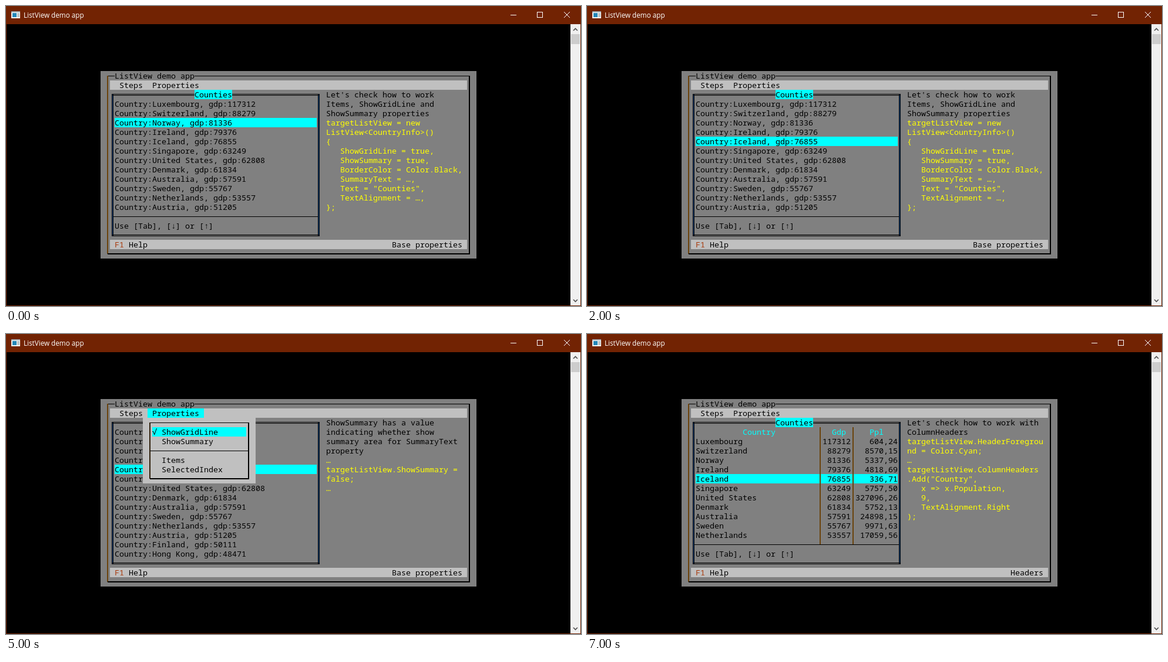
Recreate the animation shown at these times as an HTML page with a canvas. Size 979 by 512 pixels, loop 8 s.

```html
<!DOCTYPE html>
<html lang="en">
<head>
<meta charset="utf-8">
<title>ListView demo app</title>
<style>
html, body { margin: 0; width: 100%; height: 100%; overflow: hidden; background: #000; }
canvas { display: block; }
</style>
</head>
<body>
<canvas id="stage" width="979" height="512"></canvas>
<script>
const ctx = document.getElementById('stage').getContext('2d', { alpha: false });
const CELL_W = 8, CELL_H = 16, LEFT = 161, TOP = 111;
const GRAY = '#808080', SILVER = '#c0c0c0', CYAN = '#00ffff', YELLOW = '#ffff00';
const BLACK = '#000', BROWN = '#6b430c', BLUE = '#0b4a86', ACCENT = '#722303';
const MONO = '13.333px "Noto Sans Mono", "DejaVu Sans Mono", monospace';

const countries = [
  ['Luxembourg', '117312', '604,24'], ['Switzerland', '88279', '8570,15'],
  ['Norway', '81336', '5337,96'], ['Ireland', '79376', '4818,69'],
  ['Iceland', '76855', '336,71'], ['Singapore', '63249', '5757,50'],
  ['United States', '62808', '327096,26'], ['Denmark', '61834', '5752,13'],
  ['Australia', '57591', '24898,15'], ['Sweden', '55767', '9971,63'],
  ['Netherlands', '53557', '17059,56'], ['Austria', '51205'],
  ['Finland', '50111'], ['Hong Kong', '48471']
];

const itemsHelp = {
  note: "Let's check how to work\nItems, ShowGridLine and\nShowSummary properties",
  code: `targetListView = new
ListView<CountryInfo>()
{
   ShowGridLine = true,
   ShowSummary = true,
   BorderColor = Color.Black,
   SummaryText = …,
   Text = "Counties",
   TextAlignment = …,
};`
};
const indexHelp = {
  note: `FirstVisibleItemIndex has an
index of first visible item,
SelectedIndex has an index of
the selected item in the
control. Also use
VisibleItems property for get
all visible items.`,
  code: 'FirstVisibleItemIndex: 0\nSelectedIndex: 4'
};
const summaryHelp = {
  note: `ShowSummary has a value
indicating whether show
summary area for SummaryText
property`,
  code: '…\ntargetListView.ShowSummary =\nfalse;\n…'
};
const gridHelp = {
  note: `ShowGridLine has a value
indicating whether grid lines
appear between the columns
containing the items in the
control`,
  code: '…\ntargetListView.ShowGridLine =\nfalse;\n…'
};
const headersHelp = {
  note: "Let's check how to work with\nColumnHeaders",
  code: `targetListView.HeaderForegrou
nd = Color.Cyan;
…
targetListView.ColumnHeaders
.Add("Country",
   x => x.Population,
   9,
   TextAlignment.Right
);`
};

const base = { selected: 4, grid: true, summary: true, menu: null, headers: false };
const scenes = [
  { help: itemsHelp, selected: 2 },
  { help: itemsHelp, selected: 3 },
  { help: itemsHelp },
  { help: indexHelp, menu: 'ShowSummary' },
  { help: summaryHelp, summary: false },
  { help: summaryHelp, summary: false, menu: 'ShowGridLine' },
  { help: gridHelp, summary: false, grid: false },
  { help: headersHelp, headers: true }
].map(scene => ({ ...base, ...scene }));

function fill(color, x, y, w, h) {
  ctx.fillStyle = color;
  ctx.fillRect(x, y, w, h);
}

function cells(color, col, row, cols, rows = 1) {
  fill(color, LEFT + col * CELL_W, TOP + row * CELL_H, cols * CELL_W, rows * CELL_H);
}

function text(str, col, row, color = BLACK) {
  ctx.font = MONO;
  ctx.fillStyle = color;
  [...str].forEach((ch, i) => {
    if (ch !== ' ') ctx.fillText(ch, LEFT + (col + i) * CELL_W, TOP + row * CELL_H + 13);
  });
}

const textRight = (str, endCol, row) => text(str, endCol - str.length, row);

function stroke(color, points, width = 1) {
  ctx.strokeStyle = color;
  ctx.lineWidth = width;
  ctx.beginPath();
  points.forEach(([x, y]) => ctx.lineTo(x, y));
  ctx.stroke();
}

function drawWindow() {
  fill(ACCENT, 0, 0, 979, 512);
  fill(BLACK, 1, 31, 960, 480);

  fill('#f4f4f4', 9, 9, 15, 12);
  fill('#a8b4bc', 9, 9, 15, 2);
  fill('#2386b8', 11, 12, 7, 7);
  fill('#bcc4c8', 19, 12, 4, 7);
  ctx.font = '11.7px "Open Sans", "Noto Sans", sans-serif';
  ctx.fillStyle = '#fff';
  ctx.fillText('ListView demo app', 30, 20);

  fill('#fff', 859, 15, 10, 1);
  ctx.strokeStyle = '#fff';
  ctx.lineWidth = 1;
  ctx.strokeRect(904.5, 10.5, 9, 9);
  stroke('#fff', [[950, 10], [960, 20]]);
  stroke('#fff', [[960, 10], [950, 20]]);

  fill('#f0f0f0', 961, 31, 17, 480);
  fill('#cdcdcd', 962, 48, 15, 17);
  stroke('#505050', [[966, 42], [969.5, 38.5], [973, 42]], 1.6);
  stroke('#505050', [[966, 501], [969.5, 504.5], [973, 501]], 1.6);
}

function drawDialog(scene) {
  cells(GRAY, 0, 0, 80, 20);
  fill(BLACK, 173, 119, 12, 1);
  fill(BLACK, 321, 119, 468, 1);
  fill(BROWN, 172, 119, 2, 304);
  fill(BLACK, 788, 119, 2, 305);
  fill(BLACK, 173, 422, 617, 2);
  text('ListView demo app', 3, 0);

  cells(SILVER, 2, 1, 76);
  if (scene.menu) cells(CYAN, 10, 1, 12);
  text('Steps', 4, 1);
  text('Properties', 11, 1);

  cells(SILVER, 2, 18, 76);
  text('F1', 3, 18, '#a83c10');
  text('Help', 6, 18);
  textRight(scene.headers ? 'Headers' : 'Base properties', 77, 18);
}

function drawGrid(scene) {
  for (const x of [180, 531]) {
    fill(BLACK, x, 150, 3, 243);
    fill(BLUE, x + 1, 150, 1, 243);
  }
  for (const y of [150, 390]) {
    fill(BLACK, 180, y, 354, 1);
    fill(GRAY, 183, y + 1, 348, 1);
    fill(BLACK, 180, y + 2, 354, 1);
  }
  cells(CYAN, 20, 2, 8);
  text('Counties', 20, 2);
  if (scene.summary) {
    fill(BLACK, 183, 359, 348, 1);
    text('Use [Tab], [↓] or [↑]', 3, 16);
  }
}

function drawList(scene) {
  if (scene.grid) drawGrid(scene);
  const firstRow = scene.headers ? 4 : 3;
  const count = (scene.summary ? 15 : 17) - firstRow;
  cells(CYAN, 3, firstRow + scene.selected, scene.grid ? 43 : 44);

  if (scene.headers) {
    text('Country', 13, 3, CYAN);
    text('Gdp', 32, 3, CYAN);
    text('Ppl', 40, 3, CYAN);
    fill(BROWN, 396, 159, 2, 200);
    fill(BROWN, 452, 159, 2, 200);
  }
  countries.slice(0, count).forEach(([name, gdp, people], i) => {
    const row = firstRow + i;
    if (scene.headers) {
      text(name, 3, row);
      textRight(gdp, 36, row);
      textRight(people, 46, row);
    } else {
      text(`Country:${name}, gdp:${gdp}`, 3, row);
    }
  });
}

function drawHelp({ note, code }) {
  const notes = note.split('\n');
  notes.forEach((line, i) => text(line, 48, 2 + i));
  code.split('\n').forEach((line, i) => text(line, 48, 2 + notes.length + i, YELLOW));
}

function drawMenu(scene) {
  cells(SILVER, 9, 2, 24, 7);
  fill(BLACK, 245, 151, 168, 1);
  fill('#30200c', 244, 151, 2, 96);
  fill(BLACK, 412, 151, 2, 97);
  fill(BLACK, 245, 246, 169, 2);
  fill(BLACK, 245, 199, 168, 1);
  cells(CYAN, 11, scene.menu === 'ShowGridLine' ? 3 : 4, 20);
  if (scene.grid) text('√', 11, 3);
  if (scene.summary) text('√', 11, 4);
  text('ShowGridLine', 13, 3);
  text('ShowSummary', 13, 4);
  text('Items', 13, 6);
  text('SelectedIndex', 13, 7);
}

function frame(now) {
  const scene = scenes[Math.floor(now / 1000) % scenes.length];
  drawWindow();
  drawDialog(scene);
  drawList(scene);
  drawHelp(scene.help);
  if (scene.menu) drawMenu(scene);
  requestAnimationFrame(() => frame(performance.now() - start));
}

const start = performance.now();
frame(0);
</script>
</body>
</html>
```
